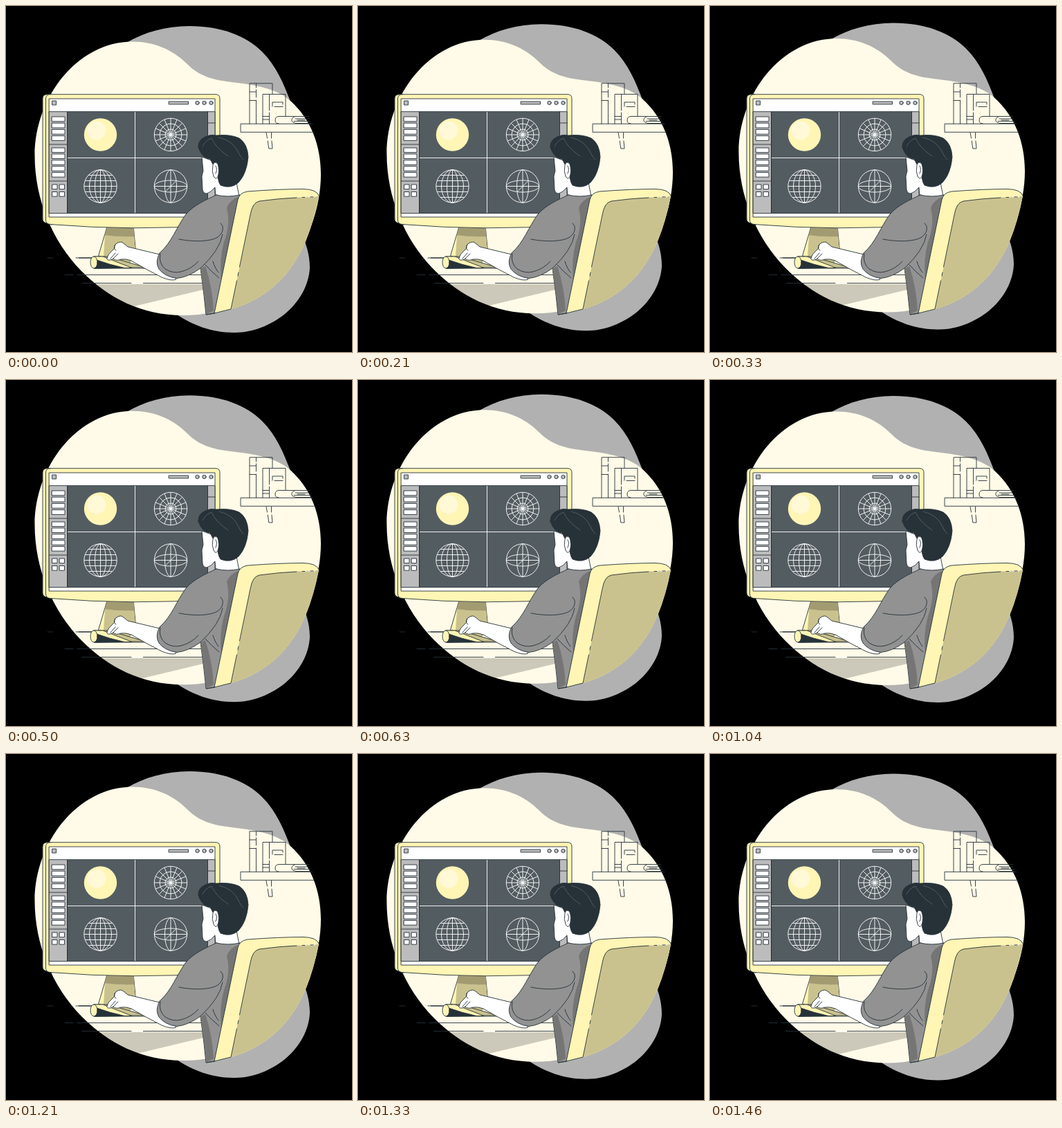
Write an HTML page that moves like this. It is 500x500 px and loops after 1500 ms.

```html
<!DOCTYPE html>
<html lang="en">
<head>
<meta charset="utf-8">
<title>Designer at work</title>
<style>
  html, body { margin: 0; width: 100%; height: 100%; overflow: hidden; background: #000; }
  svg { display: block; width: 100vw; height: 100vh; }
  .ln { stroke: #263238; stroke-width: .9; stroke-linecap: round; stroke-linejoin: round; }
  .no { fill: none; }
  .yl { fill: #fff5b5; }
  .ol { fill: #cac28e; }
  .wh { fill: #fff; }
  .gr { fill: #bcbcbc; }
  .wire { fill: none; stroke: #fff; stroke-width: .9; }
</style>
</head>
<body>
<svg viewBox="0 0 500 500">
  <g id="blobs">
    <path fill="#b1b1b1" d="M174 53C200 38 230 29 265 29C311 29 347 43 370 66C391 87 401 112 411 138L425 325C433 341 439 358 439 378C438 402 425 427 403 445C383 461 357 472 330 472C297 472 270 461 247 446L200 200Z"/>
    <path fill="#fffbe8" d="M183 51.5C214 51.5 241 63 262 84C280 102 299 107 330 110.500C362 114 392 120 411 137C441 164 455 202 455 243C455 292 436 344 403 383C368 424 314 447 256 447C196 447 148 422 109 383C67 340 41.500 279 41.500 216C41.500 132 103 51.500 183 51.500Z"/>
  </g>

  <!-- desk and shelf -->
  <path fill="#000" fill-opacity=".2" d="M110 402H285V410L185 434Z"/>
  <g class="ln no">
    <path d="M60 364H68M101 364H104M85 388.500H97M103 388.500H283M110 400.500H181M198 400.500H285"/>
    <path d="M105 364H135" stroke-width="1.3"/>
    <path d="M443 170.300H339V182.300H445M376 183L377.500 191M378.300 195L379.800 206H385L384 195M383.500 191V183"/>
    <path d="M385 127V111.800H352V170M361.500 112V118M361.500 121V132M361.500 136V170M352 124H361M352 136.500H361"/>
    <path d="M371 170V127.500H404V159M380.500 127.500V151M380.500 154V170M371 159.500H380M371 164H380M385 145V139H400V142M400 145.500H388"/>
    <path d="M438 159.500H394Q389 160 389 165Q389 170 394 170M417 160Q412 162 413 166Q414 169 419 169.500H440M418 163H438M421 165H432M416 166.500H440"/>
  </g>
  <path d="M182 400.500H198" stroke="#fff"/>

  <!-- monitor -->
  <g class="ln">
    <path class="yl" d="M147 317H184L188 360L171 378L134 361Z"/>
    <path class="ol" stroke="none" d="M147 318H184L187.500 360L171 377L141 362L143 332Z"/>
    <path fill="#a29b72" stroke="none" d="M147 318H184L185.500 333Q163 334 142.500 331Z"/>
    <path class="yl" d="M64 127.700H60Q53 127.700 53 134V308Q53 313 60 314L66 316Z"/>
    <path class="yl" d="M64 127.700H303Q309 127.700 309 134V311Q309 316 303 316.500Q185 325.500 64 315.500Q57.500 315 57.500 309V134Q57.500 127.700 64 127.700Z"/>
    <path class="wh" d="M62.500 134H302V305H62.500Z"/>
    <path class="gr" d="M62.500 152.700H88.500V299.500H62.500ZM62.500 200H88.500M62.500 253H88.500M291.500 152.700H302V299.500H291.500ZM291.500 169H302M67 137H72.500V143H67ZM235.500 138H263.500V142H235.500Z"/>
    <path fill="#535c61" d="M89 152.700H291.500V299.500H89Z"/>
    <g id="tools"></g>
  </g>
  <path class="wire" d="M186.500 153V299M89 219.500H291.500"/>
  <circle class="yl" cx="136.500" cy="186" r="23.700"/>
  <circle cx="131" cy="180" r="13.500" fill="#fff9d8"/>
  <g id="wires" class="wire"></g>

  <!-- keyboard, arm -->
  <g class="ln">
    <path class="ol" d="M127 362L148 362L202 378H171L128 379Z"/>
    <path class="yl" d="M127 362L140 362L182 378.500H171L128 379Z"/>
    <path fill="#263238" d="M131 367Q150 374 171 378.500L128 379Z"/>
    <ellipse class="yl" cx="127" cy="370.500" rx="5" ry="8.500"/>
    <path class="no" d="M128 379H205"/>
    <path class="wh" d="M146 364Q148 358 152 355L157 350Q156 345 160 343Q166 339 170 343L176 348L222 359L246 395Q239 398 225 392L202 380L181 368Q174 365 166 366Q159 369 155 365L151 367Q145 368 146 364Z"/>
    <path class="no" d="M151 365L158 357M155 365L162 358M158 345Q154 351 159 353"/>
  </g>

  <!-- person -->
  <g class="ln">
    <path class="wh" d="M302 225L283 218L285 238L283 246L284 265Q285 271 290 271Q297 269 302 262L303 275Q320 280 337 275L333 255Z"/>
    <path fill="#929292" d="M304 273Q320 277 338 273L302 444L289 446L286 418L281 379Q263 392 247 393.500Q229 391 221 380Q215 370 222 357C240 341 246 320 260 301C271 288 289 280 304 273Z"/>
    <path fill="#757575" stroke="none" d="M337 275Q322 281 319 292Q325 315 315 341Q308 366 311 398L336 278ZM281 380L288 376Q298 405 300 440L290 445Z"/>
    <path class="no" d="M223 358Q220 371 230 380Q241 387 253 384Q268 380 278 369M250 337C270 341 295 341 306 334Q315 327 313 318L310 314M313 330Q309 353 281 379M288 374Q297 384 308 393M299 369Q302 379 307 385"/>
    <path fill="#263238" d="M278 204Q277 194 288 189Q295 185 304 187Q324 185 337 191Q349 199 350 218Q348 242 336 255Q325 265 310 259Q305 252 306 236L304 225L299 229L295 221L288 219Q281 214 278 204Z"/>
    <path class="wh" d="M306 228Q301 223 299 230Q297 239 300 246Q303 252 306 247Q309 238 306 228Z"/>
    <path class="no" d="M303 231Q306 236 303 242"/>
    <path class="no" style="stroke:#7b878d;stroke-width:.5" d="M284 203Q288 194 297 191Q303 205 321 217M308 190Q329 195 336 212Q339 219 343 222"/>
  </g>

  <!-- chair -->
  <path class="yl" d="M301 444L335 280Q337 270 349 268Q395 264.500 430 264.500Q449 265 452 274Q445 311 433 340Q400 417 325 438Z"/>
  <path class="ol" d="M325 438L353 302Q356 284 366 282Q400 277 452 275Q445 311 433 340Q400 417 325 438Z"/>
  <g class="ln no">
    <path d="M290 446L301 444L335 280Q337 270 349 268Q395 264.500 430 264.500Q449 265 452 274M301 444L325 438L333.500 397M335 390L336 385M337.500 377L353 302Q356 284 366 282Q395 278 420 277"/>
    <path d="M427 276.500H434M437 276H447" stroke="#fff"/>
    <path d="M428 276.500H432M440 276H444"/>
  </g>
</svg>
<script>
const NS = 'http://www.w3.org/2000/svg';
const $ = id => document.getElementById(id);
const add = (parent, tag, attrs) => {
  const el = document.createElementNS(NS, tag);
  for (const k in attrs) el.setAttribute(k, attrs[k]);
  return parent.appendChild(el);
};

const tools = $('tools'), wires = $('wires');
const button = (x, y, width, height) => add(tools, 'rect', { x, y, width, height, class: 'wh' });
const oval = (cx, cy, rx, ry = rx) => add(wires, 'ellipse', { cx, cy, rx, ry });
const line = (x1, y1, x2, y2) => add(wires, 'line', { x1, y1, x2, y2 });
const R = 23.7;

for (let i = 0; i < 4; i++) button(66.5, 160 + i * 9.2, 18.5, 6.8);
for (let i = 0; i < 5; i++) button(66.5, 205 + i * 8.9, 18.5, 6.6);
for (const x of [67, 77.5]) for (const y of [258, 268.5]) button(x, y, 7, 6.7);
for (const cx of [276.5, 286.5, 296.5]) add(tools, 'circle', { cx, cy: 140, r: 2.7, class: 'gr' });

// polar grid
for (const r of [8, 16, R]) oval(238, 186, r);
for (let i = 0; i < 16; i++) {
  const a = i * Math.PI / 8;
  line(238, 186, 238 + R * Math.cos(a), 186 + R * Math.sin(a));
}
// globe
for (const rx of [8, 16, R]) oval(136.5, 260.5, rx, R);
line(136.5, 260.5 - R, 136.5, 260.5 + R);
for (const d of [-16, -8, 0, 8, 16]) {
  const w = Math.sqrt(R * R - d * d);
  line(136.5 - w, 260.5 + d, 136.5 + w, 260.5 + d);
}
// crossed ellipses
oval(238, 260.5, R);
oval(238, 260.5, 8.5, R);
oval(238, 260.5, R, 8.5);
line(238, 260.5 - R, 238, 260.5 + R);
line(238 - R, 260.5, 238 + R, 260.5);
line(231, 267.5, 245, 253.5);

// the backdrop floats up 10 px and back at 24 steps per second
const LOOP = 1500, STEPS = 36, LIFT = 10;
const start = performance.now();
function draw(now) {
  const t = Math.max(0, now - start) % LOOP;
  const p = Math.floor((t + 5) * STEPS / LOOP) % STEPS / STEPS;
  const y = -LIFT * (1 - Math.abs(1 - 2 * p));
  $('blobs').setAttribute('transform', `translate(0 ${y})`);
  requestAnimationFrame(draw);
}
draw(start);
</script>
</body>
</html>
```
